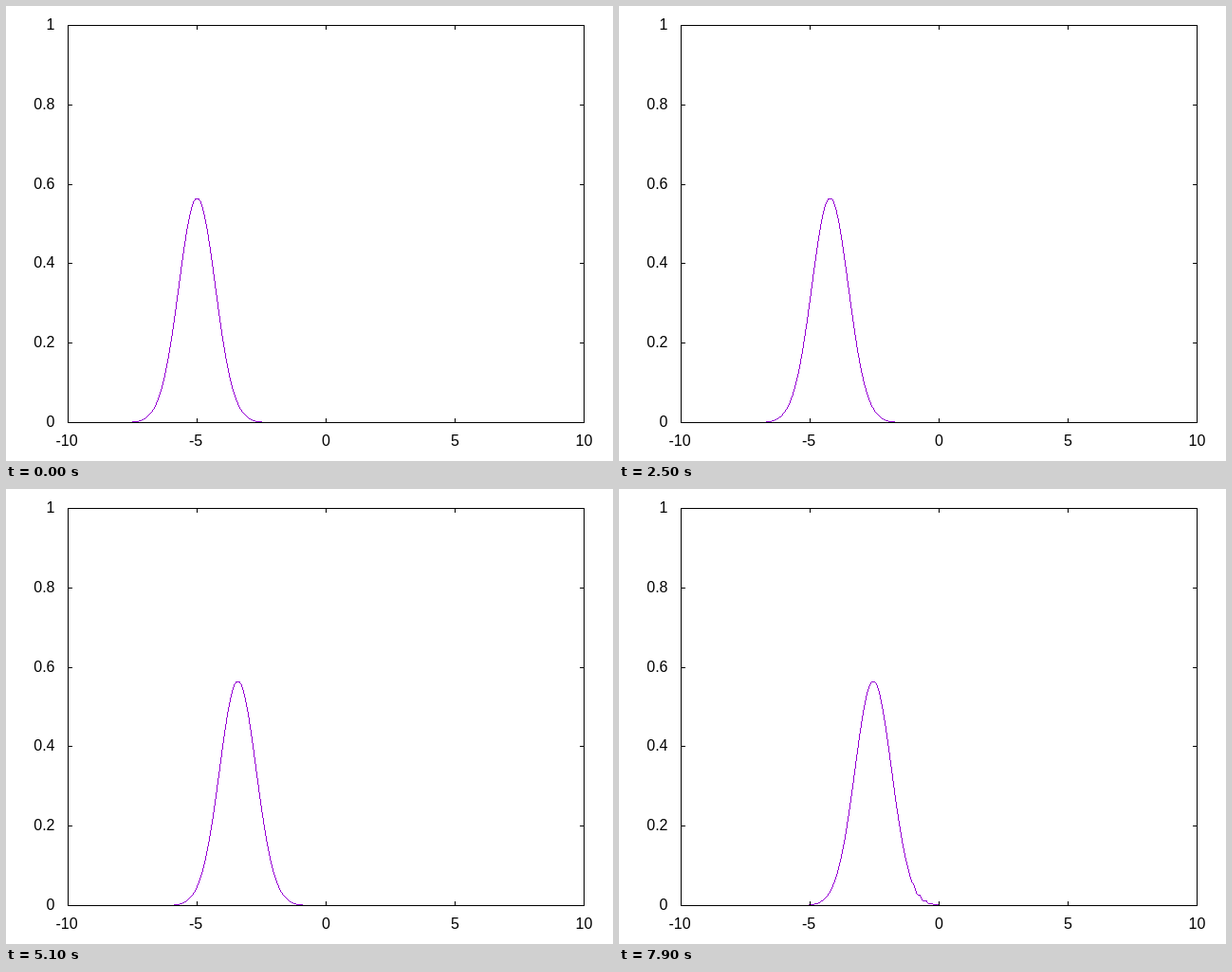
Animation of 640x480 px, one loop 8 s. Source, as an HTML page:

```html
<!DOCTYPE html>
<html lang="en">
<head>
<meta charset="utf-8">
<title>Moving wave packet</title>
<style>
  html, body { margin: 0; width: 100%; height: 100%; overflow: hidden; background: #fff; }
  svg { display: block; }
  path { shape-rendering: crispEdges; }
  text { font: 16px "Liberation Sans", Arial, sans-serif; }
</style>
</head>
<body>
<svg width="640" height="480" viewBox="0 0 640 480">
  <path id="curve" fill="#9400d3"/>
  <path id="axes" fill="none" stroke="#000"/>
  <g id="labels"></g>
</svg>
<script>
const LEFT = 65, RIGHT = 609, TOP = 20, BOTTOM = 439;
const UNIT = (RIGHT - LEFT) / 20, HEIGHT = BOTTOM - TOP;
const STEP_MS = 100, STEPS = 80, SPEED = 0.031;
const $ = id => document.getElementById(id);
const toX = x => LEFT + (x + 10) * UNIT;

function addLabel(text, x, y, anchor) {
  const el = document.createElementNS("http://www.w3.org/2000/svg", "text");
  el.setAttribute("x", x);
  el.setAttribute("y", y);
  el.setAttribute("text-anchor", anchor);
  el.textContent = text;
  $("labels").append(el);
}

function drawAxes() {
  let d = `M${LEFT + .5} ${TOP + .5}H${RIGHT + .5}V${BOTTOM + .5}H${LEFT + .5}Z`;
  for (let v = -10; v <= 10; v += 5) {
    const x = toX(v) + .5;
    d += `M${x} ${TOP}v5M${x} ${BOTTOM + 1}v-5`;
    addLabel(v, x - (v < 0 ? 1.5 : 0), 464, "middle");
  }
  for (let i = 0; i <= 5; i++) {
    const y = Math.round(BOTTOM - HEIGHT * i / 5);
    d += `M${LEFT} ${y + .5}h5M${RIGHT + 1} ${y + .5}h-5`;
    addLabel(i / 5, 51.5, y + 5, "end");
  }
  $("axes").setAttribute("d", d);
}

// Gaussian density plus the faint interference ahead of the wall at x = 0
function density(x, center) {
  const packet = Math.exp(-((x - center) ** 2)) / Math.sqrt(Math.PI);
  const ripple = 2.7 * Math.exp(-center * center - ((x + .75) / .4) ** 2)
    * Math.cos(27.1 * (x + .51));
  return x > 0 ? 0 : Math.max(0, packet + ripple);
}

function drawCurve(step) {
  const center = -5 + SPEED * step;
  const row = px => Math.round(BOTTOM - HEIGHT * density((px - LEFT) / UNIT - 10, center));
  let d = "";
  for (let px = LEFT + 1; px < RIGHT; px++) {
    const a = row(px - .5), b = row(px), c = row(px + .5);
    const top = Math.min(a, b, c);
    const bottom = Math.max(top + 1, a, b, c);
    if (top < BOTTOM) d += `M${px} ${top}h1V${bottom}h-1z`;
  }
  $("curve").setAttribute("d", d);
}

let shown = -1;
function frame() {
  const step = Math.floor(performance.now() / STEP_MS) % STEPS;
  if (step !== shown) drawCurve(shown = step);
  requestAnimationFrame(frame);
}

drawAxes();
frame();
</script>
</body>
</html>
```
